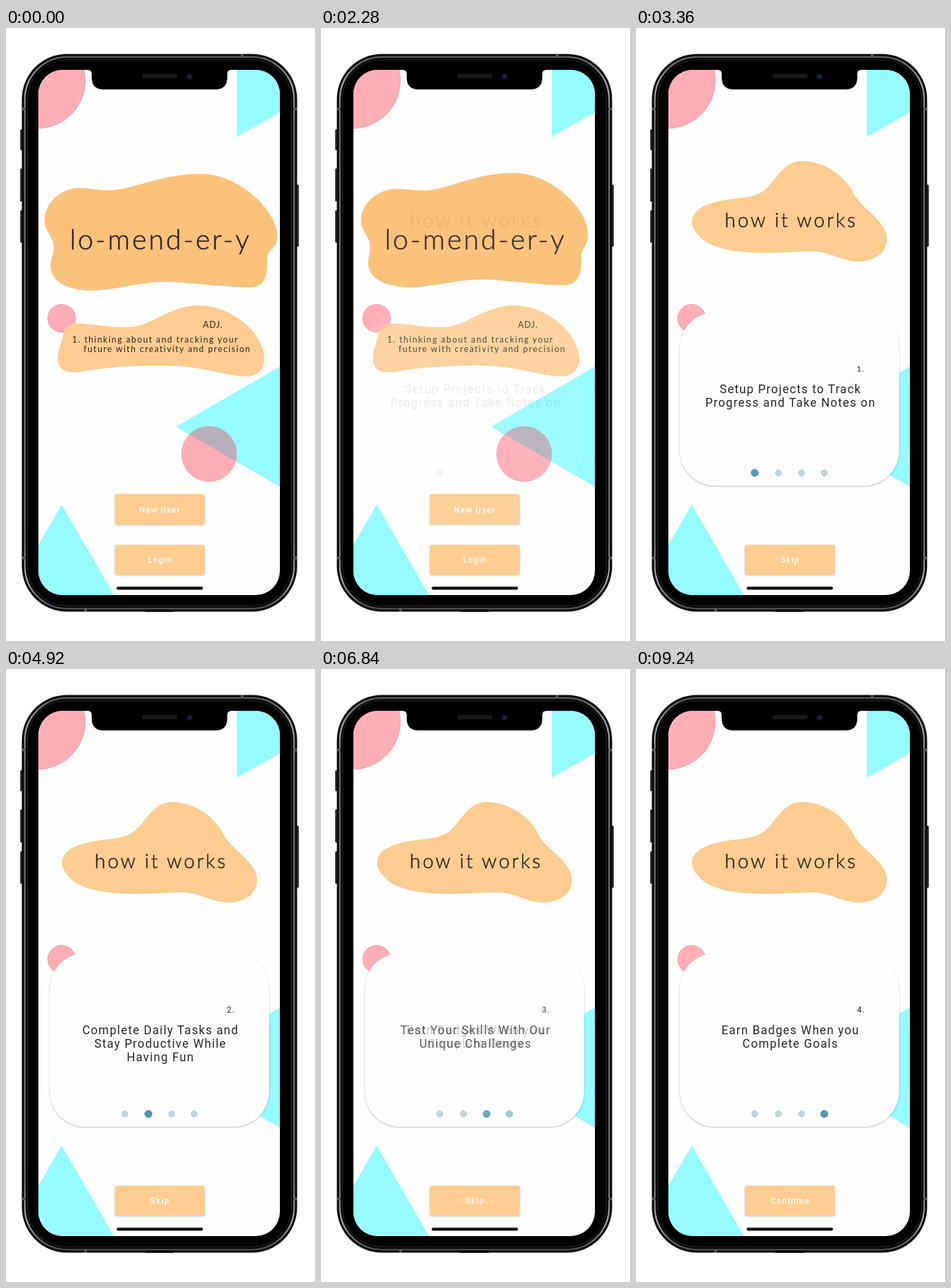
Write an HTML page that moves like this. It is 458 px wide and 908 px high and loops after 9.27 s.

```html
<!DOCTYPE html>
<html lang="en">
<head>
<meta charset="utf-8">
<title>Onboarding</title>
<style>
  html, body { margin: 0; width: 100%; height: 100%; overflow: hidden; background: #fff; }
  svg { display: block; width: 458px; height: 908px; }

  text { font-family: Roboto, sans-serif; fill: #2a2725; }
  .mid { text-anchor: middle; }
  .round { font-family: Lato, sans-serif; }
  .title, .heading { font-weight: 300; stroke: #2a2725; stroke-width: .5px; stroke-linejoin: round; }
  .title { font-size: 41px; letter-spacing: 3.1px; }
  .heading { font-size: 29px; letter-spacing: 3.1px; }
  .small { font-size: 12.5px; letter-spacing: 1.6px; }
  .number { font-size: 12px; letter-spacing: 1px; }
  .line { font-size: 17.5px; letter-spacing: 1.3px; }
  .label { font-size: 12px; font-weight: 500; letter-spacing: 1.25px; fill: #fff; }

  .pink { fill: #ffadb6; stroke: #e0929c; stroke-width: .7; }
  .cyan { fill: #95fbff; }
  .peach { fill: #fccc90; }
  .dot { fill: #bcd6e2; stroke: #9fc0cf; stroke-width: .7; }
  .active { fill: #5699b8; stroke: #417f9c; stroke-width: .8; }
  .button { fill: #fccc90; filter: drop-shadow(0 1px 1.5px rgba(0, 0, 0, .22)); }
  .sheet { fill: #fdfdfd; filter: drop-shadow(0 1px 1.2px rgba(0, 0, 0, .27)); }

  /* Four 500 ms changes, starting at 2190, 3690, 5190 and 6690 ms */
  .blob, .splash, .how, .skip, .done, .slide {
    animation: 9270ms cubic-bezier(.4, 0, .4, 1) infinite both;
  }
  .blob { animation-name: morph; }
  .splash { animation-name: leave; }
  .how { animation-name: enter; }
  .skip { animation-name: skip; }
  .done, .s4 { animation-name: last; }
  .s1 { animation-name: first; }
  .s2 { animation-name: second; }
  .s3 { animation-name: third; }

  @keyframes morph {
    0%, 23.625% {
      fill: #fac27a;
      d: path("M57 284 C57 262 78 239 105 237 C125 236 140 242 160 240 C195 236 235 216 289 216 C346 216 402 271 402 308 C402 328 388 326 387 342 C388 370 382 385 361 384 C325 384 275 377 236 376 C200 376 155 390 121 389 C88 387 66 374 66 353 C66 340 73 332 70 318 C67 306 57 300 57 284 Z");
    }
    29.018%, 100% {
      fill: #fccc90;
      d: path("M83 288 C83 264 115 257 145 253 C165 251 177 249 188 242 C206 230 216 197 246 197 C276 197 310 216 325 250 C339 270 372 288 372 312 C372 334 352 346 330 346 C305 346 288 331 262 331 C235 331 210 334 180 333 C150 332 130 329 112 321 C103 317 95 311 90 304 C86 298 83 294 83 288 Z");
    }
  }
  @keyframes leave { 0%, 23.625% { opacity: 1 } 29.018%, 100% { opacity: 0 } }
  @keyframes enter { 0%, 23.625% { opacity: 0 } 29.018%, 100% { opacity: 1 } }
  @keyframes first { 0%, 39.806% { opacity: 1 } 45.2%, 100% { opacity: 0 } }
  @keyframes second { 0%, 39.806% { opacity: 0 } 45.2%, 55.987% { opacity: 1 } 61.381%, 100% { opacity: 0 } }
  @keyframes third { 0%, 55.987% { opacity: 0 } 61.381%, 72.168% { opacity: 1 } 77.562%, 100% { opacity: 0 } }
  @keyframes last { 0%, 72.168% { opacity: 0 } 77.562%, 100% { opacity: 1 } }
  @keyframes skip { 0%, 23.625% { opacity: 0 } 29.018%, 72.168% { opacity: 1 } 77.562%, 100% { opacity: 0 } }
</style>
</head>
<body>
<svg viewBox="0 0 458 908">
  <defs>
    <clipPath id="screen"><rect x="48" y="62" width="358" height="778" rx="36"/></clipPath>
    <clipPath id="wedge"><path d="M252 590.500 L408 500.400 V680.600 Z"/></clipPath>
    <linearGradient id="metal" x2="0" y2="1">
      <stop offset="0" stop-color="#5a5b5e"/>
      <stop offset=".05" stop-color="#a2a3a6"/>
      <stop offset=".12" stop-color="#6c6d70"/>
      <stop offset=".88" stop-color="#6c6d70"/>
      <stop offset=".95" stop-color="#a2a3a6"/>
      <stop offset="1" stop-color="#4b4c4f"/>
    </linearGradient>
  </defs>

  <!-- Phone body -->
  <g fill="#2c2d2f">
    <rect x="21" y="150" width="5" height="31" rx="1.5"/>
    <rect x="21" y="208" width="5" height="49" rx="1.5"/>
    <rect x="21" y="270" width="5" height="48" rx="1.5"/>
    <rect x="429" y="232" width="5" height="92" rx="1.5"/>
    <rect x="206" y="862" width="43" height="3" rx="1"/>
  </g>
  <rect x="23.5" y="38.5" width="408" height="826" rx="67" fill="#0b0b0c"/>
  <rect x="28" y="43" width="399" height="817" rx="62.5" fill="#000" stroke="url(#metal)" stroke-width="2.4"/>
  <rect x="32" y="47" width="391" height="809" rx="58" fill="#000" stroke="#1f2022" stroke-width="1.5"/>
  <path d="M24 120 h5 M24 785 h5 M426 120 h5 M426 785 h5 M350 39 v5 M118 859 v5" stroke="#55575a" stroke-width="4"/>

  <g clip-path="url(#screen)">
    <path fill="#fefefe" d="M48 62 H406 V840 H48 Z"/>
    <circle class="pink" cx="47" cy="78" r="70.5"/>
    <path class="cyan" d="M342 60 V161 L408 124 V60 Z M252 590.500 L408 500.400 V680.600 Z M82.500 706 L160 840 H5 Z"/>
    <circle class="pink" cx="82.500" cy="430" r="20.700"/>
    <circle class="pink" cx="301" cy="631" r="40.700"/>
    <circle cx="301" cy="631" r="41" fill="#b7b0bb" clip-path="url(#wedge)"/>

    <path class="blob" d="M57 284 Z"/>

    <g class="splash">
      <text class="round title mid" x="229" y="328">lo-mend-er-y</text>
      <path class="peach" d="M77 490 C78 470 84 464 85 453 C87 441 98 437 112 438 C135 439 155 444 185 443 C215 441 245 411 285 411 C338 411 383 455 383 490 C383 505 372 516 357 516 C325 516 290 500 235 500 C185 500 150 503 122 507 C95 514 77 510 77 490 Z"/>
      <text class="round small" x="292" y="444" style="letter-spacing:1px">ADJ.</text>
      <text class="round small" x="98" y="466">1. thinking about and tracking your</text>
      <text class="round small" x="115" y="480">future with creativity and precision</text>
      <rect class="button" x="161.500" y="690.500" width="133" height="45" rx="3"/>
      <text class="label mid" x="228" y="717.500">New User</text>
    </g>

    <g class="how">
      <text class="round heading mid" x="230" y="295">how it works</text>
      <rect class="sheet" x="65" y="421" width="325" height="257" rx="52"/>
      <circle class="dot" cx="176" cy="659" r="4.500"/>
      <circle class="dot" cx="211" cy="659" r="4.500"/>
      <circle class="dot" cx="245.500" cy="659" r="4.500"/>
      <circle class="dot" cx="279" cy="659" r="4.500"/>

      <g class="slide s1">
        <text class="round number" x="327" y="508.500">1.</text>
        <text class="line mid" x="229" y="541">Setup Projects to Track</text>
        <text class="line mid" x="229" y="561">Progress and Take Notes on</text>
        <circle class="active" cx="176" cy="659" r="5.300"/>
      </g>
      <g class="slide s2">
        <text class="number" x="327.500" y="508.500">2.</text>
        <text class="line mid" x="229" y="541">Complete Daily Tasks and</text>
        <text class="line mid" x="229" y="561">Stay Productive While</text>
        <text class="line mid" x="229" y="581">Having Fun</text>
        <circle class="active" cx="211" cy="659" r="5.300"/>
      </g>
      <g class="slide s3">
        <text class="number" x="327.500" y="508.500">3.</text>
        <text class="line mid" x="229" y="541">Test Your Skills With Our</text>
        <text class="line mid" x="229" y="561">Unique Challenges</text>
        <circle class="active" cx="245.500" cy="659" r="5.300"/>
      </g>
      <g class="slide s4">
        <text class="number" x="327.500" y="508.500">4.</text>
        <text class="line mid" x="229" y="541">Earn Badges When you</text>
        <text class="line mid" x="229" y="561">Complete Goals</text>
        <circle class="active" cx="279" cy="659" r="5.300"/>
      </g>
    </g>

    <rect class="button" x="161.500" y="765.500" width="133" height="44.500" rx="3"/>
    <text class="label mid splash" x="228.500" y="792">Login</text>
    <text class="label mid skip" x="228.500" y="792">Skip</text>
    <text class="label mid done" x="228.500" y="792">Continue</text>
    <rect x="164" y="827.500" width="128" height="4.500" rx="2.200" fill="#111"/>
  </g>

  <!-- Notch -->
  <path d="M121 60 V62 Q127 62 127 68 V73 Q127 91 145 91 H310 Q328 91 328 73 V68 Q328 62 334 62 V60 Z"/>
  <rect x="202" y="68" width="52" height="6.500" rx="3.200" fill="#17181a"/>
  <circle cx="272" cy="72" r="5.200" fill="#0a0f1a"/>
  <circle cx="272" cy="72" r="2.600" fill="#142c52"/>
</svg>
</body>
</html>
```
